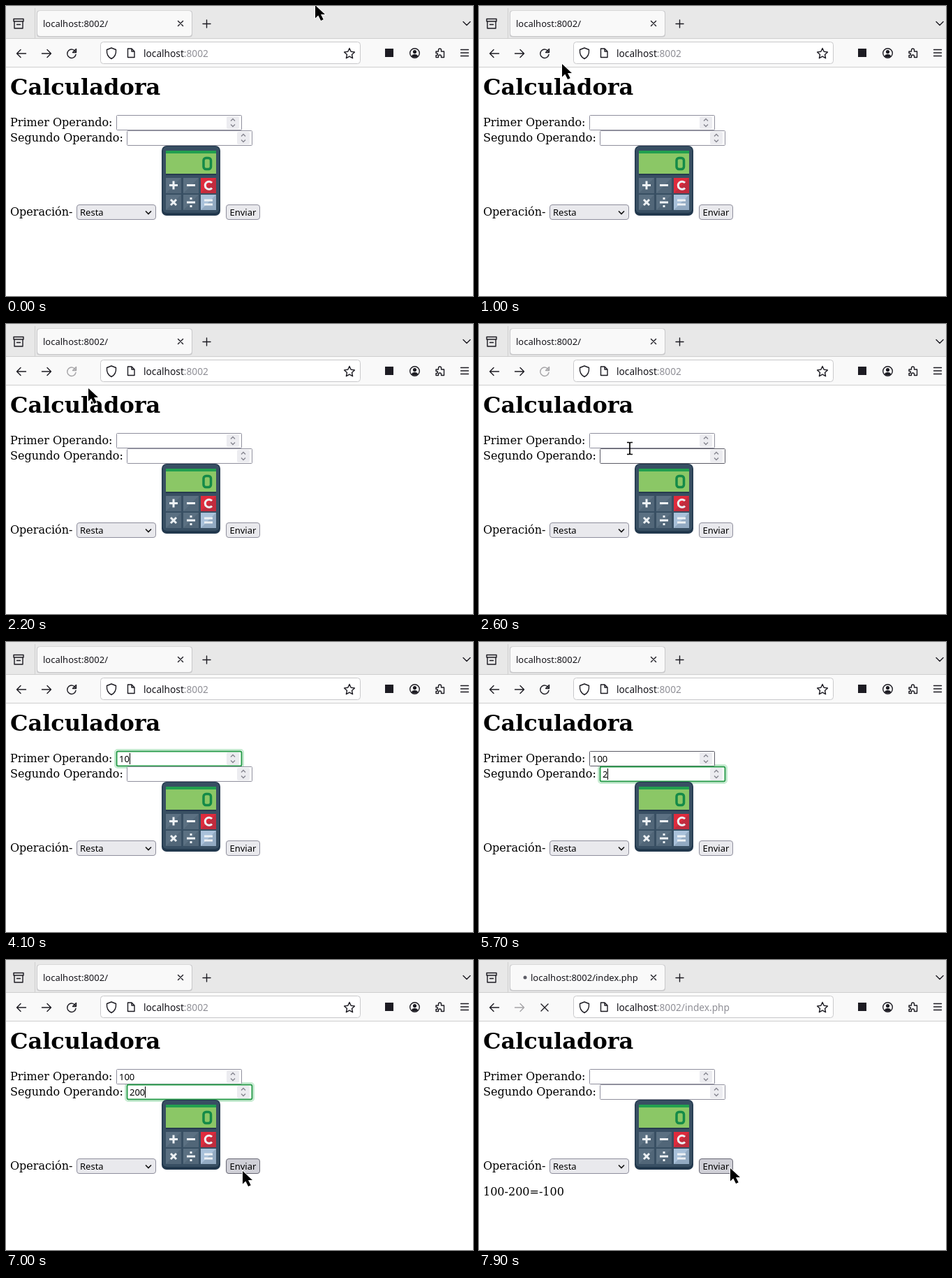
An HTML page that plays this animation: 669x415 px, repeating every 8 s.

```html
<!DOCTYPE html>
<html lang="es">
<head>
<meta charset="utf-8">
<title>Calculadora</title>
<style>
  html, body { margin: 0; width: 100%; height: 100%; overflow: hidden; background: #fff; }
  svg { display: block; width: 100%; height: 100%; }
  text { font: 13px "Noto Sans", sans-serif; }
  .page { font: 16px "DejaVu Serif", serif; }
  .title { font: bold 32px "DejaVu Serif", serif; }
  .url { font-size: 13.7px; fill: #15141a; }
  .icon { fill: none; stroke: #1c1b22; stroke-width: 1.4; stroke-linecap: round; stroke-linejoin: round; }
  .ctl { fill: #e9e9ed; stroke: #8f8f9d; }
  .field { fill: #fff; stroke: #8f8f9d; }
  .hover { stroke: #5b5b66; }
  .focus { stroke: #2a9d4c; stroke-width: 2; }
  .sign { stroke: #eef2f5; stroke-width: 3; fill: none; }
</style>
</head>
<body>
<svg viewBox="0 0 669 415">
  <defs>
    <g id="spin">
      <rect width="18" height="18" rx="2" fill="#ececf0"/>
      <path d="M6 6.500l3-3 3 3M6 11.500l3 3 3-3" fill="none" stroke="#85858f" stroke-width="1.300"/>
    </g>
  </defs>

  <!-- Browser window -->
  <path fill="#e8e8e8" d="M0 0h669v46H0z"/>
  <path fill="#f9f9f9" d="M0 46h669v42H0z"/>
  <path stroke="#cfcfcf" d="M0 46.500h669M0 87.500h669M41.500 3v43"/>
  <rect x="44" y="6.500" width="223" height="38" rx="4" fill="#c9c9cb"/>
  <rect x="45" y="7" width="221" height="36" rx="4" fill="#f9f9f9"/>
  <rect x="135.500" y="51.500" width="372" height="31" rx="4" fill="#fff" stroke="#c9c9cb"/>
  <rect id="btnHover" y="52" width="32" height="31" rx="4" fill="#d5d5d6"/>
  <ellipse id="throbber" cy="25" fill="#5c5c66"/>
  <text id="tabText" y="30" fill="#15141a"></text>
  <text class="url" x="197" y="73">localhost<tspan id="port" fill="#8f8f96"></tspan></text>
  <g class="icon">
    <path d="M11 18.500h14v3.500h-14zM12 22v10h12v-10M15.500 26.500h5"/>
    <path d="M246.500 21.500l7 7m0-7l-7 7M282 25.500h11m-5.500-5.500v11M655 22.500l5 5 5-5"/>
    <path d="M15.500 68h13m-13 0l5.500-5.500M15.500 68l5.500 5.500"/>
    <path id="forward" d="M51.500 68h13m0 0l-5.500-5.500M64.500 68l-5.500 5.500"/>
    <path id="reload" d="M99.500 65.500a6.200 6.200 0 1 0 .5 4M100.500 61.500v5h-5z"/>
    <path id="stop" d="M89 63l10 10m0-10l-10 10"/>
    <path d="M151 60l6.500 2.500c.5 6-1.500 10.500-6.500 13c-5-2.500-7-7-6.500-13z"/>
    <path d="M174.500 61h5.500l4 4v8.500h-9.500zM180 61v4h4"/>
    <path d="M492 60.500l2.200 4.800 5.200.6-3.900 3.600 1.100 5.200-4.600-2.600-4.600 2.600 1.100-5.200-3.900-3.600 5.200-.6z"/>
    <circle cx="585.500" cy="67.500" r="6.800"/>
    <path fill="#1c1b22" stroke="none" d="M585.500 63a2.600 2.600 0 1 1 0 5.200 2.600 2.600 0 1 1 0-5.200M581 72c0-4 9-4 9 0q-4.500 3-9 0"/>
    <path d="M616 65h3.500v-2a2 2 0 0 1 4 0v2h4v8.500h-4v-1.500a2 2 0 0 0-4 0v1.500h-3.500v-3h1a1.500 1.500 0 0 0 0-3h-1z"/>
    <path d="M651.500 62.500h11M651.500 67h11M651.500 71.500h11"/>
  </g>
  <rect x="543" y="61" width="12" height="12" fill="#1c1b22"/>

  <!-- Page -->
  <text class="title" x="6" y="127">Calculadora</text>
  <text class="page" x="6" y="172">Primer Operando:</text>
  <text class="page" x="6" y="194">Segundo Operando:</text>
  <text class="page" x="6" y="300">Operación-</text>
  <text class="page" id="result" x="6" y="337">100-200=-100</text>
  <rect id="glow" x="171" width="184" height="26" rx="4" fill="none" stroke="#c5ebd0" stroke-width="2"/>
  <rect id="field1" x="158.500" y="156.500" width="179" height="21"/>
  <rect id="field2" x="173.500" y="178.500" width="179" height="21"/>
  <use href="#spin" x="316" y="158"/>
  <use href="#spin" x="331" y="180"/>
  <text id="value1" x="162" y="172"></text>
  <text id="value2" x="177" y="194"></text>
  <path id="caret" stroke="#000"/>
  <rect class="ctl" x="101.500" y="284.500" width="113" height="21" rx="3.500"/>
  <text x="106" y="300" font-size="13.300">Resta</text>
  <path d="M200 293.500l4 4 4-4" fill="none" stroke="#111" stroke-width="1.600"/>
  <rect id="send" class="ctl" x="315.500" y="284.500" width="48" height="21" rx="3.500"/>
  <text x="320.500" y="300">Enviar</text>

  <!-- Calculator -->
  <rect x="223" y="200" width="84" height="100" rx="7" fill="#22384d"/>
  <rect x="224.500" y="201" width="81" height="95" rx="6" fill="#384f63"/>
  <path fill="#8bc766" d="M229 207h72v33h-72z"/>
  <path fill="#22a04f" d="M229 207h72v4h-72z"/>
  <path fill="#263b4e" d="M229 240h72v2h-72z"/>
  <rect x="283" y="217.500" width="10.500" height="16" rx="3.500" fill="none" stroke="#148a48" stroke-width="3.500"/>
  <g id="keys"></g>
  <g class="sign">
    <path d="M234 256.500h12m-6-6v12M259 256.500h12M284 278h12m-12 6h12"/>
    <path d="M236 277l8 8m0-8l-8 8M259 281h12"/>
    <path d="M295 253a5.600 5.600 0 1 0 0 7.500"/>
    <path d="M263.500 275.500h3m-3 11h3"/>
  </g>

  <path id="arrow" d="M0 0v18.500l4.300-4 3.800 7.500 3.600-1.800-3.700-7.200h6z" stroke="#fff" stroke-width="1.600" paint-order="stroke"/>
  <path id="beam" d="M-4-8.500h3l1 1 1-1h3M-4 8.500h3l1-1 1 1h3M0-7.500v15" fill="none" stroke="#000" stroke-width="1.700"/>
</svg>
<script>
const $ = id => document.getElementById(id);
const LOOP = 8000;
const ARROW = 'arrow', BEAM = 'beam';
const move = (x, y, more) => ({ x, y, ...more });

// Each entry changes part of the state from its time on.
const events = [
  [0, move(443, -1, { pointer: ARROW, hover: 0, reload: 'on', throb: 0, path: '', v1: '', v2: '', focus: 0, over: 0, send: 'idle' })],
  [300, move(240, 14)],
  [400, move(66, 26)],
  [700, move(111, 78, { hover: 42 })],
  [1000, move(119, 83, { hover: 0 })],
  [1100, move(119, 92)],
  [1200, move(118, 99)],
  [1300, move(117, 103)],
  [1700, move(110, 91)],
  [1800, move(103, 77, { hover: 78 })],
  [1900, move(102, 74, { reload: 'stop', throb: 61 })],
  [2000, { throb: 64.5 }],
  [2100, { throb: 67 }],
  [2200, move(118, 92, { hover: 0, reload: 'off', throb: 0 })],
  [2300, move(155, 128)],
  [2400, move(205, 168, { pointer: BEAM, over: 1 })],
  [2500, move(229, 196, { over: 2 })],
  [2600, move(216, 178)],
  [3100, move(204, 165, { reload: 'on', over: 1, focus: 1 })],
  [3900, { v1: '1', pointer: '' }],
  [4000, { v1: '10' }],
  [4200, { v1: '100' }],
  [4900, { focus: 2 }],
  [5700, { v2: '2' }],
  [5900, { v2: '20' }],
  [6100, { v2: '200' }],
  [6600, move(210, 184, { pointer: BEAM, over: 2 })],
  [6700, move(232, 250, { pointer: ARROW, over: 0 })],
  [6800, move(270, 325)],
  [6900, move(312, 351)],
  [7000, move(339, 302, { send: 'hover' })],
  [7100, move(352, 299)],
  [7200, move(360, 298)],
  [7500, { send: 'down', focus: 0 }],
  [7900, { send: 'hover', v1: '', v2: '', reload: 'stop', throb: 66, path: '/index.php' }]
];

const sendLook = { idle: ['#e9e9ed', '#8f8f9d'], hover: ['#d0d0d7', '#676774'], down: ['#b1b1b9', '#484851'] };

const keyColors = ['#5b7082', '#5b7082', '#df2b3d', '#5b7082', '#5b7082', '#a9c1da'];
$('keys').innerHTML = keyColors.map((color, i) => {
  const x = 229 + i % 3 * 25, y = i < 3 ? 246 : 270;
  return `<rect x="${x}" y="${y}" width="22" height="22" fill="${color}"/>
    <path d="M${x} ${y + 22}l22-22v22z" fill="#1c3246" opacity=".16"/>`;
}).join('');

function set(id, attrs) {
  for (const name in attrs) $(id).setAttribute(name, attrs[name]);
}
const show = (id, on) => set(id, { visibility: on ? 'visible' : 'hidden' });

function draw(t) {
  const s = Object.assign({}, ...events.filter(e => e[0] <= t).map(e => e[1]));

  for (const id of [ARROW, BEAM]) {
    show(id, s.pointer === id);
    set(id, { transform: `translate(${s.x} ${s.y})` });
  }

  show('btnHover', s.hover);
  set('btnHover', { x: s.hover });
  show('stop', s.reload === 'stop');
  show('reload', s.reload !== 'stop');
  set('reload', { opacity: s.reload === 'off' ? .38 : 1 });
  set('forward', { opacity: s.path ? .38 : 1 });
  show('throbber', s.throb);
  set('throbber', { cx: s.throb, rx: s.path ? 2.5 : 3.5, ry: s.path ? 2.5 : 1.6 });
  set('tabText', { x: s.throb ? 74 : 53 });
  $('tabText').textContent = 'localhost:8002' + (s.path || '/');
  $('port').textContent = ':8002' + s.path;

  for (const n of [1, 2]) {
    const look = s.focus === n ? 'focus' : s.over === n ? 'hover' : '';
    set('field' + n, { class: 'field ' + look, rx: look === 'focus' ? 2 : 1 });
    $('value' + n).textContent = s['v' + n];
  }
  show('glow', s.focus);
  show('caret', s.focus);
  if (s.focus) {
    const second = s.focus === 2;
    const x = (second ? 177.5 : 162.5) + Math.round(s['v' + s.focus].length * 7.4);
    set('glow', { x: second ? 171 : 156, y: second ? 176 : 154 });
    set('caret', { d: `M${x} ${second ? 181 : 159}v16` });
  }

  const [fill, stroke] = sendLook[s.send];
  set('send', { style: `fill:${fill};stroke:${stroke}` });
  show('result', s.path);
}

const start = performance.now();
function frame() {
  draw((performance.now() - start) % LOOP);
  requestAnimationFrame(frame);
}
frame();
</script>
</body>
</html>
```
